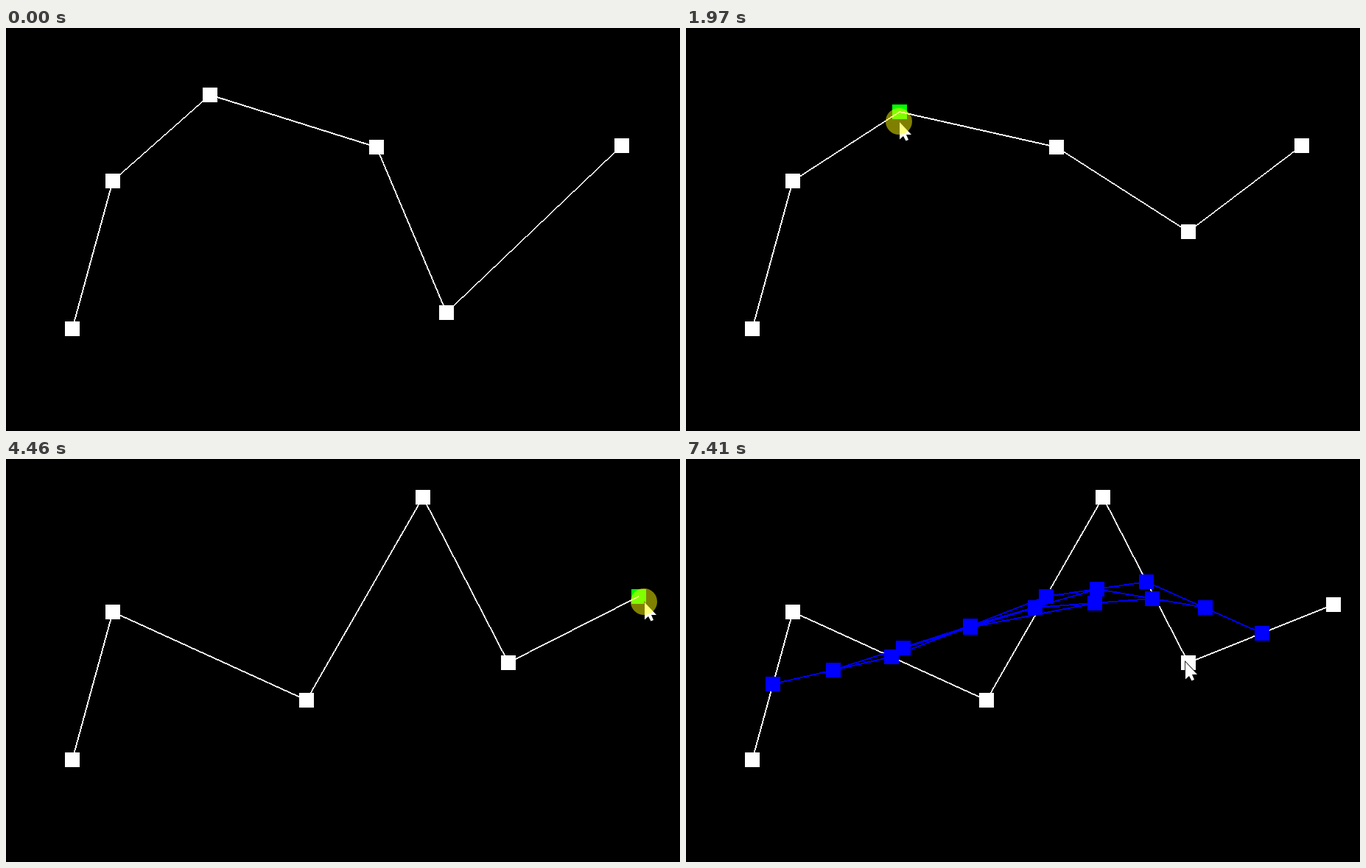
Animation of 915 by 548 pixels, one loop 8000 ms. Source, as an HTML page:

```html
<!DOCTYPE html>
<html lang="en">
<head>
<meta charset="utf-8">
<title>Curve subdivision</title>
<style>
  html, body { margin: 0; width: 100%; height: 100%; overflow: hidden; background: #000; }
  svg { display: block; width: 100vw; height: 100vh; }
</style>
</head>
<body>
<svg viewBox="0 0 915 548">
  <g id="levels" shape-rendering="crispEdges"></g>
  <g id="pointer">
    <path d="M0 0V23.5L5 19L8.5 25.5L12 24L9 17H16Z" fill="#fff" stroke="#000" stroke-width="1.6" paint-order="stroke"/>
    <circle id="press" cx="-1" cy="-1" r="18" fill="#ff0" fill-opacity=".5"/>
  </g>
</svg>
<script>
const LOOP = 8000, START = 130, STEP = 68.77, LAST = 106;
const RATIO = 0.51, LAG = 0.45, LEVELS = 4;

const start = [[90, 409], [145, 208], [277, 91], [503, 162], [598, 387], [836, 160]];
const entry = [711, 438];

// Each move eases to a point, optionally bent towards a control point.
const moves = [
  { from: 0, to: 11, end: [589, 387], bend: [640, 300] },
  { from: 11, to: 15.7, end: [673, 277], bend: [660, 334] },
  { from: 18, to: 25, end: [270, 91], bend: [176, 109] },
  { from: 25, to: 33, end: [401, 328] },
  { from: 34, to: 37, end: [494, 153] },
  { from: 37, to: 46, end: [590, 16], bend: [600, 96] },
  { from: 46, to: 52, end: [557, 43], bend: [588, 42] },
  { from: 53, to: 61, end: [835, 160], bend: [1010, 175] },
  { from: 61, to: 65, end: [878, 198], bend: [877, 211] },
  { from: 68, to: 76, end: [486, 212] },
  { from: 79, to: 87, end: [578, 235] },
  { from: 91, to: 101, end: [678, 276], bend: [760, 285] }
];

const drags = [
  { node: 4, from: 11, to: 18 },
  { node: 2, from: 25, to: 34 },
  { node: 3, from: 37, to: 53 },
  { node: 5, from: 61, to: 68 }
];

const revealAt = i => 73 + 10.5 * i;
const smooth = u => u * u * (3 - 2 * u);
const mix = (a, b, u) => a.map((v, i) => v + (b[i] - v) * u);
const $ = id => document.getElementById(id);

function pointerAt(k) {
  let pos = entry;
  for (const { from, to, end, bend = mix(pos, end, 0.5) } of moves) {
    if (k < from) break;
    const u = smooth(Math.min(1, (k - from) / (to - from)));
    pos = mix(mix(pos, bend, u), mix(bend, end, u), u);
  }
  return pos;
}

function nodesAt(k) {
  const nodes = start.slice();
  let held = -1;
  for (const { node, from, to } of drags) {
    if (k < from) break;
    // The node trails the pointer slightly and keeps its grab offset.
    const grab = pointerAt(from);
    const now = pointerAt(Math.min(to - LAG, Math.max(from, k - LAG)));
    nodes[node] = start[node].map((v, i) => v + now[i] - grab[i]);
    if (k < to) held = node;
  }
  return { nodes, held };
}

const subdivide = pts => pts.slice(1).map((p, i) => mix(pts[i], p, RATIO));

const square = ([x, y], fill) =>
  `<rect x="${x - 10}" y="${y - 10}" width="20" height="20" fill="${fill}"/>`;

// Two pixels across the minor axis, whatever the slope.
function line([x1, y1], [x2, y2], color) {
  const dx = x2 - x1, dy = y2 - y1;
  const width = 2 * Math.max(Math.abs(dx), Math.abs(dy)) / Math.hypot(dx, dy);
  return `<path d="M${x1} ${y1}L${x2} ${y2}" stroke="${color}" stroke-width="${width}"/>`;
}

function level(points, color, held = -1) {
  const pts = points.map(p => p.map(Math.round));
  return pts.map((p, i) => square(p, i === held ? '#0f0' : color)).join('') +
    pts.slice(1).map((p, i) => line(pts[i], p, color)).join('');
}

function draw(t) {
  const visible = t >= START;
  const k = visible ? Math.min(LAST, Math.floor((t - START) / STEP + 0.34)) : -1;
  const { nodes, held } = nodesAt(k);

  let pts = nodes, out = level(nodes, '#fff', held);
  for (let i = 0; i < LEVELS && k >= revealAt(i); i++) {
    pts = subdivide(pts);
    out += level(pts, '#00f');
  }
  $('levels').innerHTML = out;

  const [x, y] = pointerAt(k).map(Math.round);
  $('pointer').setAttribute('transform', `translate(${x} ${y})`);
  $('pointer').setAttribute('visibility', visible ? 'visible' : 'hidden');
  $('press').setAttribute('opacity', held < 0 ? 0 : 1);
}

const t0 = performance.now();
function tick() {
  draw((performance.now() - t0) % LOOP);
  requestAnimationFrame(tick);
}
tick();
</script>
</body>
</html>
```
